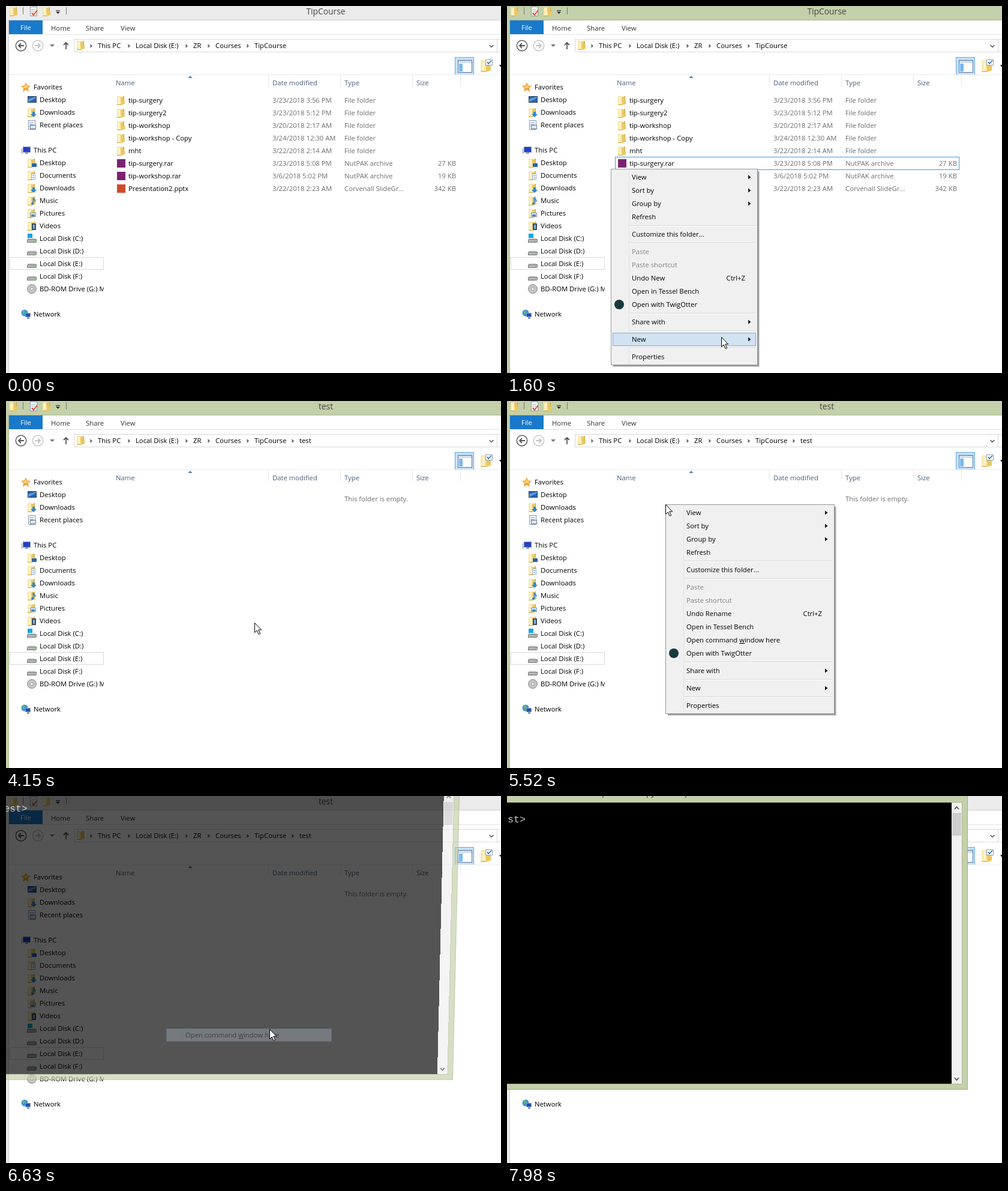
These frames come from a looping animation (825 by 611 pixels, 8000 ms). An HTML page:

```html
<!DOCTYPE html>
<html lang="en">
<head>
<meta charset="utf-8">
<title>File window</title>
<style>
html, body { margin: 0; width: 100%; height: 100%; overflow: hidden; background: #fff; }
svg { display: block; width: 100%; height: 100%; }
text { font: 11.3px "Open Sans", "Noto Sans", sans-serif; white-space: pre; }
.title { font-size: 13.8px; }
.mono { font: 16.67px "Liberation Mono", "DejaVu Sans Mono", monospace; }
rect { shape-rendering: crispEdges; }
</style>
</head>
<body>
<svg id="stage" viewBox="0 0 825 611" xmlns="http://www.w3.org/2000/svg"></svg>
<script>
const LOOP = 8000, GREY = '#6d6d6d', ACTIVE = '#c3d0a9', INACTIVE = '#ebebeb';

// Drawing helpers: all return SVG markup
const rect = (x, y, w, h, fill, stroke) => stroke
  ? `<rect x="${x + .5}" y="${y + .5}" width="${w - 1}" height="${h - 1}" fill="${fill}" stroke="${stroke}"/>`
  : `<rect x="${x}" y="${y}" width="${w}" height="${h}" fill="${fill}"/>`;
const text = (x, y, s, fill = '#000', attrs = '') => `<text x="${x}" y="${y}" fill="${fill}" ${attrs}>${s}</text>`;
const shape = (d, fill) => `<path d="${d}" fill="${fill}"/>`;
const line = (d, stroke, w = 1) => `<path d="${d}" fill="none" stroke="${stroke}" stroke-width="${w}"/>`;
const group = (transform, body, attrs = '') => `<g transform="${transform}" ${attrs}>${body}</g>`;
const square = color => rect(1, 1, 14, 14, color);

const folder = shape('M1 1h7v14H1z', '#f9e6a6') + shape('M7 3l5-2v7h2v6l-6 2z', '#ebc763') +
  shape('M3 3h3v11H3z', '#fdf3cd') + line('M1 15.5h7M12.5 1v7', '#c9a647');
const withBadge = badge => folder + badge;
const arrowBadge = shape('M9 7h4v4h3l-5 5-5-5h3z', '#2c86d4');
const disk = shape('M2 7h11l2 3H0z', '#dcdcdc') +
  '<rect x=".5" y="9.5" width="15" height="5" rx="1.5" fill="#b5b5b5" stroke="#777"/>' + rect(11, 11, 2, 2, '#5d5');
const screen = rect(1, 2, 15, 11, '#2765ad', '#33475f') + shape('M2 12V7l13-4v2z', '#5d9ddd');
const globe = '<circle cx="6" cy="6" r="5.5" fill="#3d93d6"/>' + shape('M3 2l4 1-1 3-3 2z', '#6cbf5c') +
  rect(7, 6, 9, 7, '#1e4fb4', '#8fa1b8') + rect(10, 13, 4, 3, '#8a98aa');
const page = color => rect(2, 0, 12, 16, '#fff', '#8a98a8') + line('M4 4.5h7M4 7.5h7M4 10.5h5', color);

const icons = {
  folder, disk, screen, globe,
  star: shape('M8 0l2.4 5.3 5.6.7-4.1 3.9 1.1 5.8L8 12.8 3 15.7l1.1-5.8L0 6l5.6-.7z', '#f3a33a') +
    shape('M8 3l1.5 3.6 3.5.5-3 2.4H5L3 7l3.5-.4z', '#fbd27a'),
  down: withBadge(arrowBadge),
  recent: page('#6a94c4') + rect(5, 8, 10, 7, '#dbe8f5', '#6d8098'),
  pc: rect(0, 5, 3, 9, '#c9ced6') + rect(3, 2, 13, 10, '#2340c8', '#8d9bb0') + rect(7, 12, 5, 2, '#8896a8'),
  desk: withBadge(rect(8, 9, 8, 6, '#2765ad')),
  docs: withBadge(rect(7, 5, 7, 10, '#fff', '#8fb0d2') + line('M9 8.5h3M9 11.5h3', '#4b8bd0')),
  music: withBadge(line('M10.5 13V4l3 3v3', '#2380d8', 1.6) + '<circle cx="9" cy="13" r="2" fill="#2380d8"/>'),
  pics: withBadge(rect(5, 7, 10, 7, '#d8ecfb', '#7d93aa') + rect(7, 10, 6, 3, '#3e8fcd')),
  video: withBadge(rect(8, 4, 7, 11, '#3d4a5a') + rect(10, 6, 3, 7, '#79b7ea')),
  system: rect(1, 0, 8, 8, '#10a6e6') + disk,
  disc: '<circle cx="8" cy="8" r="7.5" fill="#c4c4c4" stroke="#8d8d8d"/><circle cx="8" cy="8" r="2.2" fill="#fff" stroke="#999"/>',
  archive: square('#7a2470'), slides: square('#d04a2b'), data: square('#a8383c'), word: square('#2b579a'),
  source: square('#e0984f'), paint: square('#0b1f52'), print: square('#0d7a6c'), sheet: square('#217346'),
  twig: '<circle cx="8" cy="8" r="8" fill="#17393d"/>',
  link: rect(1, 1, 14, 14, '#fff', '#8c93a8') + line('M4.5 12C4 8 6 6.5 10 6.5M7.5 3.5H11.5V8', '#25379a', 2),
  bitmap: rect(1, 2, 14, 12, '#3f96d2', '#f0e3a8') + rect(2, 9, 12, 4, '#d8a53c') + rect(2, 8, 12, 2, '#2e6a43'),
  contact: rect(0, 3, 16, 11, '#d9f0fb', '#3f9cc4') + rect(3, 6, 4, 5, '#3f9cc4') + line('M9 7.5h5M9 10.5h5', '#3f9cc4'),
  note: page('#7fbf4a') + line('M6 11l8-9', '#d9a520', 2.5)
};
const icon = (name, x, y) => group(`translate(${x} ${y})`, icons[name]);

// Fixed parts of the file window
function chrome() {
  let s = rect(5, 24, 820, 587, '#fff') + rect(4, 23, 821, 1, '#00000020') + rect(4, 23, 1, 588, '#00000020');
  s += icon('folder', 5, 1) + icon('folder', 60, 1) + rect(28, 2, 1, 12, '#777') + rect(100, 2, 1, 12, '#777');
  s += group('translate(38 1)', page('#9ab') + line('M5 11l3 3 6-8', '#e2502d', 2));
  s += line('M83 7.5h7', '#222') + shape('M83 9.5h7l-3.5 3.5z', '#222');
  s += rect(5, 24, 56, 23, '#1979ca') + text(33, 40, 'File', '#fff', 'text-anchor="middle"');
  s += text(75, 41, 'Home', '#333') + text(133, 41, 'Share', '#333') + text(191, 41, 'View', '#333') + rect(61, 47, 764, 1, '#e0e2e4');

  const round = (x, color, flip) => group(`translate(${x} 66) scale(${flip} 1)`,
    `<circle r="8.7" fill="none" stroke="${color}" stroke-width="1.4"/>` + line('M5 0H-4M0-4L-4 0 0 4', color, 1.8));
  s += round(25, '#555', 1) + round(53, '#c4c4c4', -1) + shape('M73 64h8l-4 4z', '#777');
  s += line('M100 72V61M96 65l4-4 4 4', '#555', 1.8);
  s += rect(113, 55, 706, 22, '#fff', '#d9d9d9') + rect(818, 55, 8, 22, '#fff', '#d9d9d9');
  s += icon('folder', 117, 57) + line('M805.5 65l3.5 3.5 3.5-3.5', '#555', 1.5);

  s += rect(748, 85, 32, 30, '#c6e0f8', '#64a8ea') + rect(753, 90, 24, 21, '#fff', '#56789c') +
    rect(754, 91, 22, 4, '#d5dde6') + rect(755, 96, 6, 13, '#79b8ee');
  s += group('translate(790 89) scale(1.3)', folder) + rect(799, 89, 12, 10, '#fff', '#8aa0b5') + line('M802 93l2 3 5-5', '#2767ab', 1.5);
  s += shape('M822 98h6l-3 4z', '#111') + rect(5, 114, 820, 1, '#ececec');

  [['Name', 183], ['Date modified', 444], ['Type', 564], ['Size', 684]].forEach(c => s += text(c[1], 132, c[0], '#4c607a'));
  [437, 557, 677, 757].forEach(x => s += rect(x, 115, 1, 18, '#e6e6e6'));
  s += shape('M303.5 120l3.5-4 3.5 4z', '#4a86ad');

  s += rect(6, 418, 157, 21, '#fff', '#d9d9d9');
  const side = (y, list) => list.split(',').forEach((item, i) => {
    const [name, label] = item.split('|'), x = i ? 35 : 25;
    s += icon(name, x, y - 8 + 21 * i) + text(x + 21, y + 4 + 21 * i, label, '#000', 'clip-path="url(#side)"');
  });
  side(135, 'star|Favorites,screen|Desktop,down|Downloads,recent|Recent places');
  side(240, 'pc|This PC,desk|Desktop,docs|Documents,down|Downloads,music|Music,pics|Pictures,video|Videos,' +
    'system|Local Disk (C:),disk|Local Disk (D:),disk|Local Disk (E:),disk|Local Disk (F:),disc|BD-ROM Drive (G:) MX');
  side(513, 'globe|Network');
  return s;
}

function crumbs(opened) {
  const parts = [['This PC', 153], ['Local Disk (E:)', 216], ['ZR', 312], ['Courses', 349], ['TipCourse', 414]];
  if (opened) parts.push(['test', 489]);
  return parts.map(([s, x]) => shape(`M${x - 12.5} 63l3.5 3.5-3.5 3.5z`, '#666') + text(x, 70, s)).join('');
}

const files = [
  'folder|tip-surgery|3/23/2018 3:56 PM|File folder|',
  'folder|tip-surgery2|3/23/2018 5:12 PM|File folder|',
  'folder|tip-workshop|3/20/2018 2:17 AM|File folder|',
  'folder|tip-workshop - Copy|3/24/2018 12:30 AM|File folder|',
  'folder|mht|3/22/2018 2:14 AM|File folder|',
  'archive|tip-surgery.rar|3/23/2018 5:08 PM|NutPAK archive|27 KB',
  'archive|tip-workshop.rar|3/6/2018 5:02 PM|NutPAK archive|19 KB',
  'slides|Presentation2.pptx|3/22/2018 2:23 AM|Corvenall SlideGr...|342 KB'
];

function fileList(t) {
  if (t >= 4150) return text(564, 167, 'This folder is empty.', GREY);
  const rows = files.slice(), made = t >= 3010;
  const typed = t < 3230 ? 'New folder' : t < 3380 ? 't' : t < 3630 ? 'te' : 'test';
  if (made) rows.splice(5, 0, `folder|${typed}|3/24/2018 1:04 AM|File folder|`);
  let s = '';
  if (t >= 3920) s += rect(180, 251, 574, 22, '#d1e8ff', '#66a7e8');
  else if (t >= 790 && !made) s += rect(180, 251, 574, 22, '#fff', '#3f9be0');
  rows.forEach((row, i) => {
    const [kind, name, date, type, size] = row.split('|'), y = 161 + 21 * i;
    s += icon(kind, 184, y - 12);
    if (made && i === 5 && t < 3920) {
      const fresh = typed === 'New folder';
      s += rect(201, 252, fresh ? 84 : 29 + 6 * typed.length, 19, '#fff', '#646464');
      if (fresh) s += rect(203, 254, 61, 15, '#3399ff');
      s += text(204, y, name, fresh ? '#fff' : '#000');
    } else s += text(204, y, name);
    s += text(444, y, date, GREY) + text(564, y, type, GREY) + text(750, y, size, GREY, 'text-anchor="end"');
  });
  return s;
}

// Menu items: label|icon|shortcut, "~" disabled, ">" opens a submenu, "-" separator
const COMMAND = 'Open command <tspan text-decoration="underline">w</tspan>indow here';
const headItems = ['>View', '>Sort by', '>Group by', 'Refresh', '-', 'Customize this folder...', '-', '~Paste', '~Paste shortcut'];
const tailItems = ['Open with TwigOtter|twig', '-', '>Share with', '-', '>New', '-', 'Properties'];
const firstMenu = [...headItems, 'Undo New||Ctrl+Z', 'Open in Tessel Bench', ...tailItems];
const secondMenu = [...headItems, 'Undo Rename||Ctrl+Z', 'Open in Tessel Bench', COMMAND, ...tailItems];
const newMenu = ['Folder|folder', 'Shortcut|link', '-', 'Corvenall Keeper Database|data', 'Bitmap image|bitmap',
  'Contact|contact', 'Corvenall Vello Document|word', 'WNK4 Source File|source', 'Corvenall SlideGrove Presentation|slides',
  'Arvelo Tintmaker Image 13|paint', 'Corvenall Leafprint Document|print', 'NutPAK archive|archive',
  'Text Document|note', 'Corvenall Tabel Worksheet|sheet', 'NutPAK ZIP archive|archive'];

const glow = (x, y, w) => rect(x + 3, y, w - 6, 22, '#d1e2f2', '#78aee5');

function menu(x, y, w, items, [cx, cy], pinned) {
  let top = y + 3, s = '';
  for (const item of items) {
    if (item === '-') {
      s += rect(x + 31, top + 3, w - 35, 1, '#d7d7d7') + rect(x + 31, top + 4, w - 35, 1, '#fff');
      top += 7;
      continue;
    }
    const [label, pic, key] = item.split('|');
    const hover = cx >= x && cx < x + w && cy >= top && cy < top + 22;
    if (pinned ? item === pinned : hover) s += glow(x, top, w);
    s += text(x + 35, top + 15, label.replace(/^[~>]/, ''), item[0] === '~' ? '#838383' : '#000');
    if (pic) s += icon(pic, x + 6, top + 3);
    if (key) s += text(x + w - 21, top + 15, key, '#000', 'text-anchor="end"');
    if (item[0] === '>') s += shape(`M${x + w - 16} ${top + 7.5}l4.5 3.5-4.5 3.5z`, '#111');
    top += 22;
  }
  const h = top + 3 - y;
  const shadow = [3, 2, 1].map(d => rect(x + 4, y + 4, w - 4 + d, h - 4 + d, '#0000002c')).join('');
  return shadow + rect(x, y, w, h, '#f0f0f0', '#979797') + rect(x + 30, y + 2, 1, h - 4, '#e2e3e3') + s;
}

// The chosen item fades out after its menu closes, in steps of 80 ms
function lingering(age, x, y, w, label, pic) {
  const opacity = .7 * (1 - Math.floor(age / 80) * 80 / 260);
  return opacity <= 0 ? '' : `<g opacity="${opacity}">` + glow(x, y, w) + rect(x + 30, y + 1, 1, 20, '#c3d6e8') +
    text(x + 35, y + 15, label) + (pic ? icon(pic, x + 6, y + 3) : '') + '</g>';
}

function menus(t, at) {
  if (t >= 860 && t < 2940) {
    const open = t >= 1700;
    return menu(173, 271, 245, firstMenu, at, open && '>New') + (open ? menu(412, 248, 260, newMenu, at) : '');
  }
  if (t >= 2940 && t < 3200) return lingering(t - 2940, 412, 251, 260, 'Folder', 'folder');
  if (t >= 5520 && t < 6470) return menu(264, 172, 282, secondMenu, at);
  if (t >= 6470) return lingering(t - 6470, 264, 387, 282, COMMAND);
  return '';
}

// Pointer moves: start, end, steps, x, y
const moves = [
  [60, 790, 11, 173, 271], [940, 1460, 8, 357, 549], [1600, 1600, 1, 357, 551], [1700, 2000, 5, 428, 557],
  [2070, 2350, 5, 470, 309], [2440, 2650, 4, 468, 271], [2940, 3460, 8, 414, 369], [4770, 5060, 5, 184, 262],
  [5140, 5380, 4, 264, 172], [5660, 6310, 10, 439, 388], [6710, 7050, 5, 430, -40]
];
function pointer(t) {
  let x = 260, y = 620;
  for (const [from, to, n, tx, ty] of moves) {
    if (t < from) break;
    const u = t >= to ? 1 : (Math.floor((t - from) / (to - from) * (n - 1)) + 1) / n;
    x += (tx - x) * u;
    y += (ty - y) * u;
  }
  return [Math.round(x), Math.round(y)];
}

function terminal(t) {
  if (t < 6550) return '';
  const tick = 6470 + 80 * Math.floor((t - 6470) / 80);
  const alpha = Math.min(1, (tick - 6510) / 180);
  const k = 1.86 * Math.max(0, 1 - (tick - 6550) / 300) ** 2;
  const chevron = (y, d) => line(`M746 ${y + d}l3.5 ${-2 * d}l3.5 ${2 * d}`, '#505050', 1.8);
  let s = rect(-300, -30, 1068, 519, ACTIVE, '#a3b08a') + rect(-290, 10, 1049, 470, '#aab791') + rect(-290, 11, 1031, 468, '#000');
  s += text(158, -1, 'p', '#333', 'class="title"') + text(217, -1, 'copy', '#333', 'class="title"') + text(277, -1, 'step', '#333', 'class="title"');
  s += rect(741, 11, 17, 468, '#f0f0f0') + rect(742, 28, 15, 38, '#cdcdcd') + chevron(20, 2) + chevron(471, -2);
  s += text(31, 44, 'E:\\ZR\\Courses\\TipCourse\\test>', '#c8c8c8', 'class="mono" text-anchor="end"');
  if (t >= 7030 && t < 7530) s += rect(31, 42, 10, 5, '#c0c0c0');
  const drop = t >= 7980 ? 0 : -20;
  const tilt = `matrix(${1 - .023 * k} 0 ${-.0235 * k} ${1 + .005 * k} ${5.7 * k} ${1.5 * k})`;
  return group(`${tilt} translate(0 ${drop})`, s, `opacity="${alpha}"`);
}

const stage = document.getElementById('stage');
stage.innerHTML = '<defs><clipPath id="side"><rect x="5" y="115" width="158" height="496"/></clipPath></defs>' +
  `<rect id="frame" width="825" height="611"/>${chrome()}` +
  ['name', 'crumbs', 'list', 'terminal', 'menus'].map(id => `<g id="${id}"></g>`).join('') +
  '<path id="pointer" d="M.5 .5v16l3.7-3.5 3 6.5 2.5-1.2-3-6.3h5z" fill="#fff" stroke="#000"/>';

const layer = id => document.getElementById(id);
const shown = {};
function fill(id, markup) {
  if (shown[id] !== markup) layer(id).innerHTML = shown[id] = markup;
}

function draw(t) {
  const at = pointer(t), opened = t >= 4150;
  layer('frame').setAttribute('fill', t >= 790 && t < 6550 ? ACTIVE : INACTIVE);
  fill('name', text(533, 14, opened ? 'test' : 'TipCourse', '#444', 'class="title" text-anchor="middle"'));
  fill('crumbs', crumbs(opened));
  fill('list', fileList(t));
  fill('menus', menus(t, at));
  fill('terminal', terminal(t));
  layer('pointer').setAttribute('transform', `translate(${at})`);
}

const start = performance.now();
function loop() {
  draw((performance.now() - start) % LOOP);
  requestAnimationFrame(loop);
}
loop();
</script>
</body>
</html>
```
